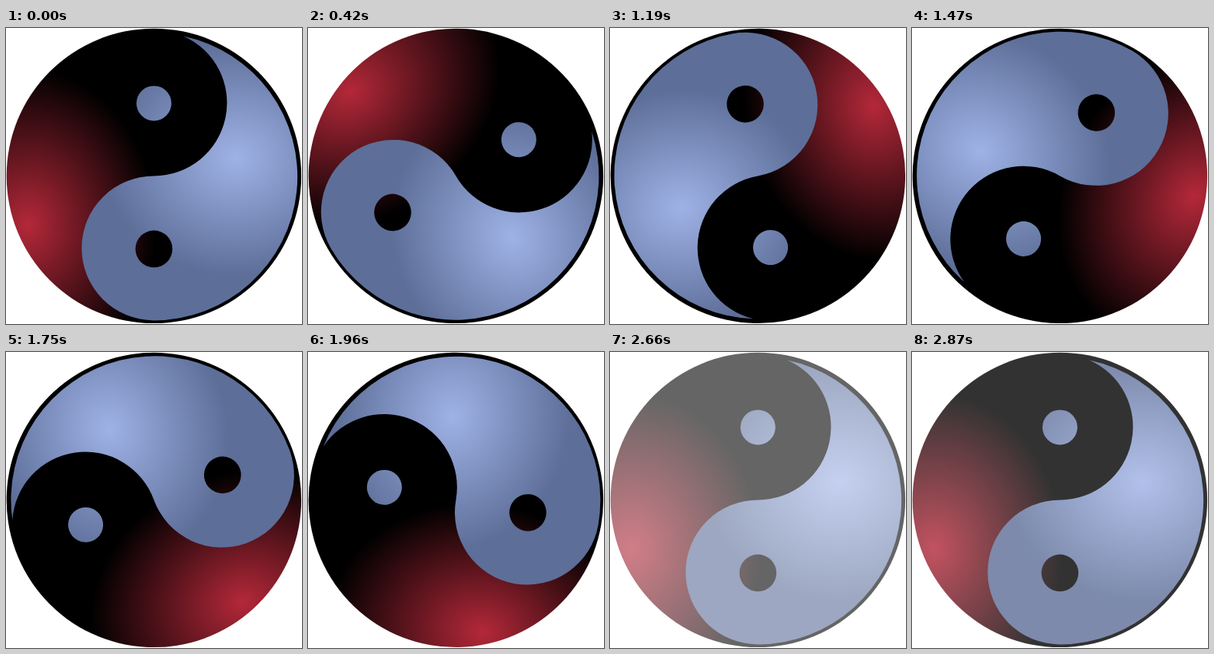
An HTML page for the animation above (2.94 s loop, 381 by 381 pixels).

```html
<!DOCTYPE html>
<html lang="en">
<head>
<meta charset="utf-8">
<title>Turning yin and yang</title>
<style>
  html, body { margin: 0; width: 100%; height: 100%; overflow: hidden; background: #fff; }
  svg { display: block; width: 100%; height: 100%; }
</style>
</head>
<body>
<svg viewBox="0 0 381 381">
  <defs>
    <radialGradient id="ember" gradientUnits="userSpaceOnUse" cx="0" cy="0" r="1"
                    gradientTransform="translate(-162 63) scale(165 200)">
      <stop offset="0" stop-color="#b42839"/>
      <stop offset="1" stop-color="#000"/>
    </radialGradient>
    <radialGradient id="sky" gradientUnits="userSpaceOnUse" cx="0" cy="0" r="1"
                    gradientTransform="translate(105 -23) scale(172 152)">
      <stop offset="0" stop-color="#9fb2e6"/>
      <stop offset="1" stop-color="#5d6e98"/>
    </radialGradient>
  </defs>
  <g id="symbol">
    <circle r="189.7" fill="url(#ember)"/>
    <path fill="url(#sky)" d="M38-180A185 185 0 0 1 0 186A93 93 0 0 1 0 0A94 94 0 0 0 38-180Z"/>
    <circle cy="-93.5" r="22.5" fill="url(#sky)"/>
    <circle cy="94" r="23.8" fill="url(#ember)"/>
  </g>
</svg>
<script>
  const STEP_MS = 70;
  const TURN_STEPS = 36;   // one full turn, 10 degrees per step
  const FADE_STEPS = 6;    // fade out and back in at rest
  const symbol = document.getElementById('symbol');

  function draw(now) {
    const step = Math.floor(now / STEP_MS) % (TURN_STEPS + FADE_STEPS);
    const fade = Math.max(0, step - TURN_STEPS);
    const angle = step < TURN_STEPS ? step * 10 : 0;
    symbol.setAttribute('transform', `translate(190.4 190.4) rotate(${angle})`);
    symbol.setAttribute('opacity', 1 - 0.2 * Math.min(fade, FADE_STEPS - fade));
  }

  const start = performance.now();
  function tick() {
    draw(performance.now() - start);
    requestAnimationFrame(tick);
  }
  tick();
</script>
</body>
</html>
```
